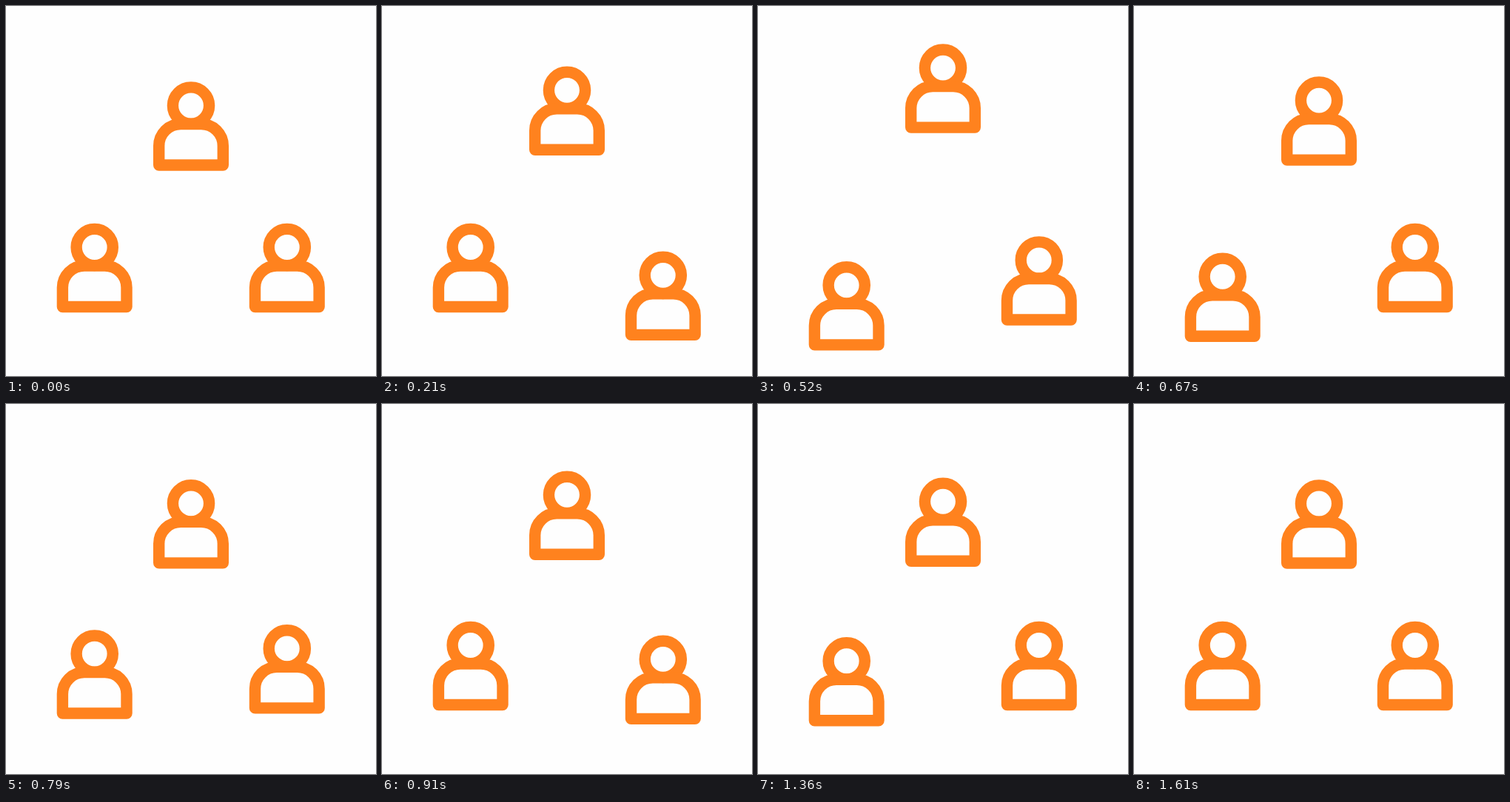
Write an HTML page that moves like this. It is 500 by 500 pixels and loops after 2000 ms.

```html
<!DOCTYPE html>
<html lang="en">
<head>
<meta charset="utf-8">
<title>Bouncing people</title>
<style>
  html, body { margin: 0; height: 100%; overflow: hidden; background: #fefefe; }
  svg { display: block; width: 100%; height: 100%; }
</style>
</head>
<body>
<svg viewBox="0 0 500 500">
  <defs>
    <g id="person" fill="none" stroke="#ff821e" stroke-width="15.4" stroke-linejoin="round">
      <circle cy="134.5" r="24.6"/>
      <path d="M-43.3 215V189a29.5 29.5 0 0 1 29.5-29.5H13.8a29.5 29.5 0 0 1 29.5 29.5V215Z"/>
    </g>
  </defs>
  <use href="#person"/>
  <use href="#person"/>
  <use href="#person"/>
</svg>
<script>
  const LOOP = 2000;

  // Each hop is [start ms, duration ms, vertical travel].
  const people = [
    { x: 250, y: 0, hops: [[90, 648, -67.5], [778, 644, -32]] },
    { x: 119.7, y: 191.5, hops: [[223, 672, 53], [943, 646, 26.5]] },
    { x: 379.8, y: 191.5, hops: [[3, 644, 52.5], [705, 644, 26.5]] }
  ];
  const figures = document.querySelectorAll('svg > use');

  function hopOffset(time, [start, duration, travel]) {
    const p = (time - start) / duration;
    return p > 0 && p < 1 ? travel * Math.sin(Math.PI * p) ** 2 : 0;
  }

  function draw() {
    const time = performance.now() % LOOP;
    people.forEach(({ x, y, hops }, i) => {
      const dy = hops.reduce((sum, hop) => sum + hopOffset(time, hop), y);
      figures[i].setAttribute('transform', `translate(${x} ${dy})`);
    });
    requestAnimationFrame(draw);
  }
  draw();
</script>
</body>
</html>
```
